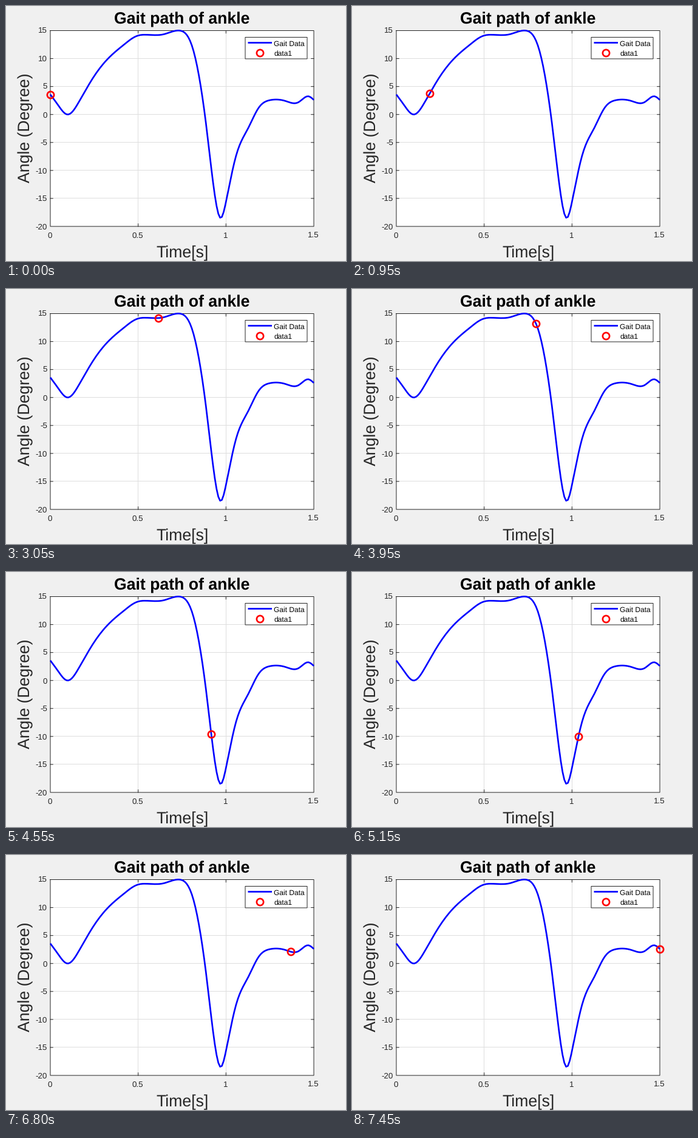
Write a matplotlib script that moves like this. It is 560 px wide and 420 px high and loops after 7500 ms.

```python
import numpy as np
import matplotlib.pyplot as plt
from matplotlib.animation import FuncAnimation
from matplotlib.patches import Rectangle

W, H, DPI = 560, 420, 100
FRAMES, INTERVAL = 150, 50
LEFT, RIGHT, TOP, BOTTOM = 73, 507, 40.5, 363
TICK = 4.3
INK, GRID = "#262626", "#dedede"
BLUE, RED = "#0000ff", "#ff0000"

plt.rcParams["font.family"] = "Liberation Sans"
plt.rcParams["text.hinting"] = "none"


def pt(px):
    return px * 72 / DPI


def to_x(t):
    return LEFT + (RIGHT - LEFT) * t / 1.5


def to_y(deg):
    return TOP + (BOTTOM - TOP) * (15 - deg) / 35


def spline(x, kx, ky):
    """Natural cubic spline through the key points."""
    n, h = len(kx), np.diff(kx)
    a, b = np.eye(n), np.zeros(n)
    for i in range(1, n - 1):
        a[i, i - 1:i + 2] = h[i - 1], 2 * (h[i - 1] + h[i]), h[i]
        b[i] = 6 * ((ky[i + 1] - ky[i]) / h[i] - (ky[i] - ky[i - 1]) / h[i - 1])
    m = np.linalg.solve(a, b)
    i = np.clip(np.searchsorted(kx, x, side="right") - 1, 0, n - 2)
    u, v, d = kx[i + 1] - x, x - kx[i], h[i]
    return ((m[i] * u**3 + m[i + 1] * v**3) / (6 * d)
            + (ky[i] / d - m[i] * d / 6) * u
            + (ky[i + 1] / d - m[i + 1] * d / 6) * v)


# Key poses of the ankle: seconds, degrees
KEYS = np.array([
    (0, 3.58), (0.045, 1.65), (0.097, 0), (0.161, 2.16), (0.239, 6.35),
    (0.322, 9.78), (0.422, 12.56), (0.491, 14.02), (0.553, 14.25),
    (0.644, 14.33), (0.736, 15), (0.805, 12.4), (0.888, -2.1),
    (0.933, -13.7), (0.97, -18.5), (1.002, -15.3), (1.058, -7.3),
    (1.127, -2.4), (1.185, 1.16), (1.248, 2.55), (1.338, 2.42),
    (1.413, 2.2), (1.469, 3.26), (1.5, 2.6),
])
time = np.linspace(0, 1.5, FRAMES)
px, py = to_x(time), to_y(spline(time, *KEYS.T))

fig = plt.figure(figsize=(W / DPI, H / DPI), dpi=DPI, facecolor="#f0f0f0")
ax = fig.add_axes([0, 0, 1, 1])
ax.set_xlim(0, W)
ax.set_ylim(H, 0)
ax.axis("off")


def line(xs, ys, color=INK, width=1.0, **kw):
    return ax.plot(xs, ys, color=color, lw=pt(width), snap=False, **kw)[0]


def grid(xs, ys):
    line(np.ceil(xs) - 0.5, np.ceil(ys) - 0.5, GRID, solid_capstyle="butt")


def label(x, y, s, size, color=INK, ha="center", **kw):
    ax.text(x, y, s, fontsize=pt(size), color=color, ha=ha, va="baseline", **kw)


def ring(x, y):
    return line([x], [y], marker="o", ms=pt(11.2), mfc="none", mec=RED,
                mew=pt(2.67), zorder=8)


def box(x, y, w, h, edge, **kw):
    ax.add_patch(Rectangle((x, y), w, h, fc="white", ec=edge, lw=pt(1),
                           snap=False, **kw))


# Axes
box(LEFT, TOP, RIGHT - LEFT, BOTTOM - TOP, "none")
for t in (0, 0.5, 1, 1.5):
    x = to_x(t)
    if 0 < t < 1.5:
        grid([x, x], [TOP, BOTTOM])
        line([x, x], [TOP, TOP + TICK], zorder=3)
        line([x, x], [BOTTOM, BOTTOM - TICK], zorder=3)
    label(x - 0.5, 382, f"{t:g}", 13.33)
for deg in range(-20, 16, 5):
    y = to_y(deg)
    if -20 < deg < 15:
        grid([LEFT, RIGHT], [y, y])
        line([LEFT, LEFT + TICK], [y, y], zorder=3)
        line([RIGHT, RIGHT - TICK], [y, y], zorder=3)
    label(68, y + 4.7, f"{deg}", 13.33, ha="right")
line([LEFT, RIGHT, RIGHT, LEFT, LEFT], [TOP, TOP, BOTTOM, BOTTOM, TOP], zorder=3)

label(290, 29, "Gait path of ankle", 26.67, "black", weight="bold")
label(291, 414, "Time[s]", 26.67)
label(39.3, 201, "Angle (Degree)", 26.67, rotation=90, rotation_mode="anchor")

line(px, py, BLUE, 2.67, zorder=4, solid_joinstyle="round", solid_capstyle="butt")

# Legend
box(394, 51.5, 102, 35.5, INK, zorder=6)
line([398.5, 438], [60.5, 60.5], BLUE, 2.67, zorder=7, solid_capstyle="butt")
ring(418, 77)
label(441.4, 66, "Gait Data", 12, "black", ha="left", zorder=7)
label(441.4, 82, "data1", 12, "black", ha="left", zorder=7)

marker = ring(px[0], py[0])


def update(i):
    marker.set_data([px[i]], [py[i]])
    return (marker,)


anim = FuncAnimation(fig, update, frames=FRAMES, interval=INTERVAL,
                     repeat=True, repeat_delay=0, blit=False)
plt.show()
```
